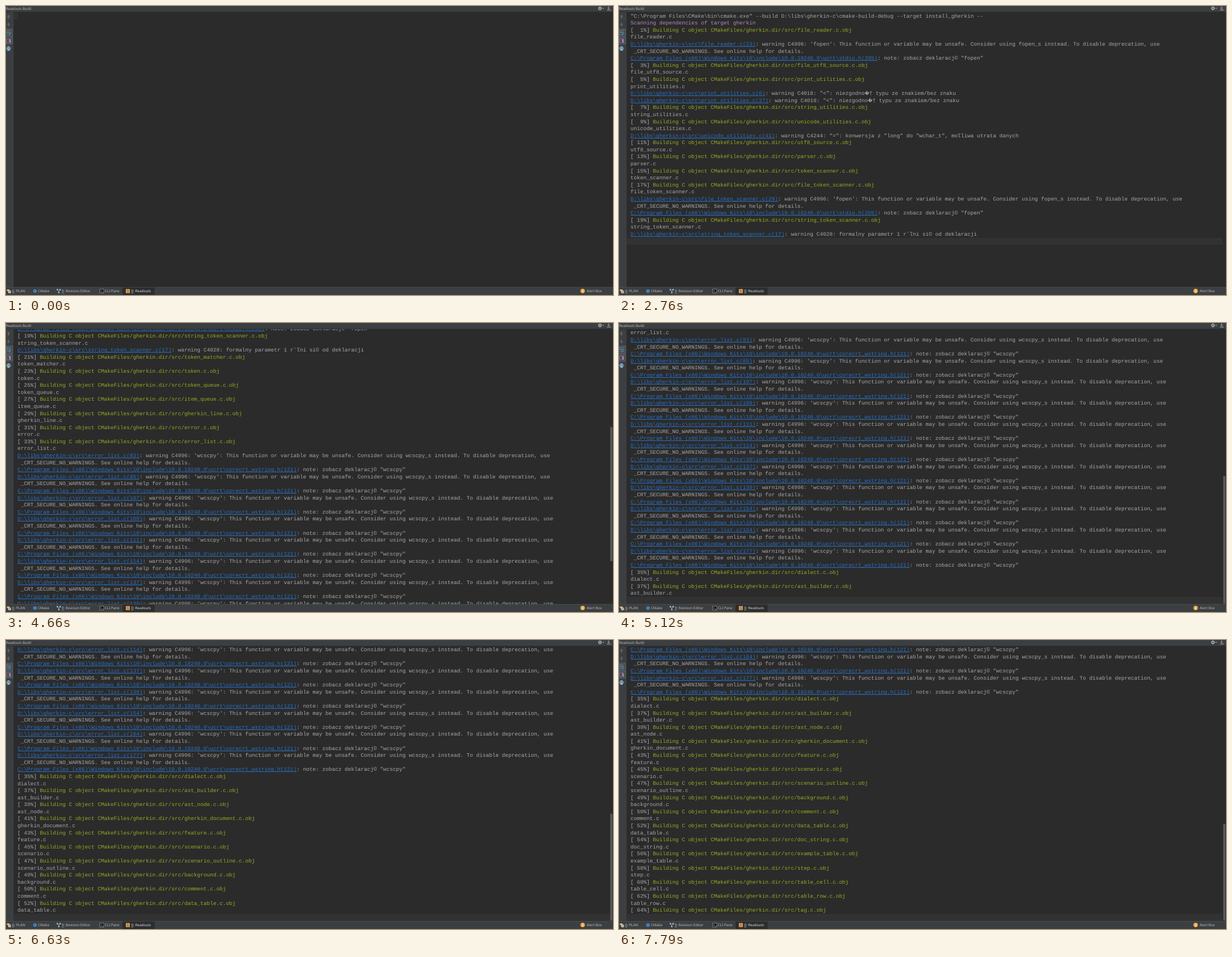
An HTML page that plays this animation: 1084 by 517 pixels, repeating every 8 s.

```html
<!DOCTYPE html>
<html lang="en">
<head>
<meta charset="utf-8">
<title>Build output</title>
<style>
html, body { margin: 0; width: 100%; height: 100%; overflow: hidden; background: #2b2b2b; }
body { position: relative; text-rendering: geometricPrecision; }
svg { position: absolute; left: 0; top: 0; }
svg text { font: 6.35px "Noto Sans", "Open Sans", sans-serif; fill: #bbb; white-space: pre; }
.key { text-decoration: underline; }
#pane { position: absolute; left: 14px; top: 11px; width: 1070px; height: 492px; overflow: hidden; }
#caret { position: absolute; left: 0; height: 12.6px; background: #323232; }
#rows {
  position: absolute; left: 6.5px; width: 1050px; overflow: hidden;
  font: 9.55px/12.6px "Liberation Mono", "Courier New", monospace;
  color: #a6a6a6; white-space: pre;
}
#rows div { position: relative; top: 1px; height: 12.6px; }
#thumb { position: absolute; left: 1065px; width: 4px; background: #58595a; }
.ok { color: #96aa22; }
.scan { color: #ae8abe; }
.link {
  color: #2870c4; text-decoration: underline; text-decoration-thickness: 1px;
  text-underline-offset: 1px; text-decoration-skip-ink: none;
}
.odd { font: 8px/0 "DejaVu Sans", sans-serif; }
</style>
</head>
<body>
<div id="pane">
  <div id="caret"></div>
  <div id="rows"></div>
  <div id="thumb"></div>
</div>

<svg width="1084" height="517" viewBox="0 0 1084 517">
  <path d="M0 0H1084V10.5H0ZM0 11H13.5V503H0ZM0 503H1084V517H0Z" fill="#3c3f41"/>
  <path d="M0 10.7H1084" stroke="#323435" stroke-width=".7"/>
  <path d="M0 503.3H1084" stroke="#505354" stroke-width=".8"/>
  <rect x="208" y="503.7" width="57.5" height="13.3" fill="#2b2d2e"/>

  <!-- header -->
  <text x="0" y="7.2">Readouts Build</text>
  <g stroke="#afb1b3" fill="none">
    <circle cx="1060.7" cy="4.2" r="2" stroke-width="1.5"/>
    <circle cx="1060.7" cy="4.2" r="3.1" stroke-width="1" stroke-dasharray="1.2 1.23"/>
    <path d="M1076.2 .8V5M1074.4 3.4L1076.2 5.3L1078 3.4M1073.2 7.2H1080" stroke-width="1"/>
  </g>
  <path d="M1065 3.6H1068L1066.5 5.3Z" fill="#afb1b3"/>

  <!-- side buttons -->
  <path d="M4.5 15.6L7.4 19H5.6V22.4H3.4V19H1.6ZM4.5 36.6L7.4 33.2H5.6V29.8H3.4V33.2H1.6Z" fill="#5f6365"/>
  <path d="M-1 41.5H11.4V53.8H-1ZM-1 55.6H11.4V68H-1Z" fill="#45494b" stroke="#67757d" stroke-width=".8"/>
  <g fill="none" stroke="#5fa9cf" stroke-width="1">
    <path d="M.8 44.5H8.5" stroke-dasharray="2 .8"/>
    <path d="M.8 47.4H7.2Q9 47.4 8.6 49.4T5 50.8M6.2 49.3L4.6 50.8L6.2 52.2M.8 50.8H3"/>
  </g>
  <path d="M1 58.7H8.2V65.2H1Z" fill="none" stroke="#8e8197" stroke-width=".8"/>
  <path d="M5.2 59.4H7.8V62.2L9 65.6H6.6L5.4 62.8Z" fill="#b57fd0"/>
  <path d="M2.3 72.2H6.8V74H2.3Z" fill="#8fabb9"/>
  <path d="M.6 74H8.5V77.7H.6Z" fill="#5596b8"/>
  <path d="M2.3 76.4H6.8V80H2.3Z" fill="#9fadb5"/>

  <!-- bottom tabs -->
  <path d="M1.5 507H6L7 509.5L4.5 511.5L1.5 509Z" fill="#d9b676"/>
  <circle cx="6.4" cy="511.4" r="2.7" fill="#c9c3b8"/>
  <path d="M6.4 509.8V511.6H7.8" fill="none" stroke="#6b5a3d" stroke-width=".7"/>
  <text x="11" y="512.4"><tspan class="key">6</tspan>: PLAN</text>

  <circle cx="51.7" cy="510" r="3.3" fill="#3f7fc1"/>
  <text x="57" y="512.4">CMake</text>

  <path d="M92 507.6L94.3 510.3V513M96.6 507.6L94.3 510.3" fill="none" stroke="#8db4cf" stroke-width="1"/>
  <g fill="#8fc0e2">
    <circle cx="91.8" cy="507.5" r="1.4"/><circle cx="96.7" cy="507.5" r="1.4"/><circle cx="94.3" cy="512.7" r="1.4"/>
  </g>
  <text x="99.5" y="512.4"><tspan class="key">9</tspan>: Revision Editor</text>

  <rect x="167.6" y="506.7" width="7.2" height="6.7" fill="#111" stroke="#a5a7a8" stroke-width=".7"/>
  <path d="M169 508.6L170.5 510L169 511.4M171.2 511.8H173.4" fill="none" stroke="#ddd" stroke-width=".7"/>
  <text x="176.6" y="512.4">CLI Pane</text>

  <rect x="214" y="506.4" width="7.2" height="7.2" fill="#e0a860"/>
  <path d="M215.3 508.3H218M215.3 510H219.8M215.3 511.8H220M219 507.6L220 508.6" stroke="#7a4f1c" stroke-width=".7"/>
  <text x="223.7" y="512.4" style="fill:#ddd"><tspan class="key">0</tspan>: Readouts</text>

  <circle cx="1029.8" cy="509.8" r="4.1" fill="#e0a03c"/>
  <text x="1028" y="512.1" style="font-weight:700;fill:#fff">2</text>
  <text x="1037" y="512.4">Alert Box</text>
</svg>

<script>
const LOOP = 8000, PITCH = 12.6, VIEW = 38, HEIGHT = 491;

const files = `file_reader file_utf8_source print_utilities string_utilities unicode_utilities
  utf8_source parser token_scanner file_token_scanner string_token_scanner token_matcher token
  token_queue item_queue gherkin_line error error_list dialect ast_builder ast_node
  gherkin_document feature scenario scenario_outline background comment data_table doc_string
  example_table step table_cell table_row tag`.split(/\s+/);

const span = (cls, text) => `<span class="${cls}">${text}</span>`;
const warn = (file, line, text) =>
  span('link', `D:\\libs\\gherkin-c\\src\\${file}.c(${line})`) + ': warning ' + text;

// A deprecation warning takes three rows
const unsafe = (file, line, fn, header) => [
  warn(file, line, `C4996: '${fn}': This function or variable may be unsafe. ` +
    `Consider using ${fn}_s instead. To disable deprecation, use`),
  ' _CRT_SECURE_NO_WARNINGS. See online help for details.',
  span('link', `C:\\Program Files (x86)\\Windows Kits\\10\\include\\10.0.10240.0\\ucrt\\${header}`) +
    `: note: zobacz deklaracj© "${fn}"`
];
const signs = line => warn('print_utilities', line,
  `C4018: "&lt;": niezgodno${span('odd', '\uFFFD')}† typu ze znakiem/bez znaku`);

const notes = {
  file_reader: unsafe('file_reader', 23, 'fopen', 'stdio.h(205)'),
  print_utilities: [6, 27].map(signs),
  unicode_utilities: [warn('unicode_utilities', 41,
    'C4244: "=": konwersja z "long" do "wchar_t", moľliwa utrata danych')],
  file_token_scanner: unsafe('file_token_scanner', 29, 'fopen', 'stdio.h(205)'),
  string_token_scanner: [warn('string_token_scanner', 17,
    'C4028: formalny parametr 1 r˘ľni si© od deklaracji')],
  error_list: [83, 85, 107, 109, 111, 114, 137, 139, 154, 164, 177]
    .flatMap(n => unsafe('error_list', n, 'wcscpy', 'corecrt_wstring.h(121)'))
};

const lines = [
  '"C:\\Program Files\\CMake\\bin\\cmake.exe" --build D:\\libs\\gherkin-c\\cmake-build-debug --target install_gherkin --',
  span('scan', 'Scanning dependencies of target gherkin'),
  ...files.flatMap((f, i) => [
    `[${String(2 * i + (i < 25)).padStart(3)}%] ` +
      span('ok', `Building C object CMakeFiles/gherkin.dir/src/${f}.c.obj`),
    f + '.c',
    ...(notes[f] || [])
  ])
];

// [time, printed lines, scroll in rows while it still lags behind]
const steps = [
  [0, 0], [90, 1], [840, 3], [1070, 9], [1360, 13], [1600, 16], [1830, 18], [2060, 21],
  [2290, 23], [2430, 26], [2760, 32], [3040, 34], [3360, 36], [3750, 39], [3980, 41],
  [4220, 43], [4660, 79, 28.56], [4740, 79, 38], [4810, 79], [5120, 83], [5330, 85],
  [5560, 88], [5790, 90], [6030, 93], [6390, 96], [6630, 99], [6930, 102], [7160, 104],
  [7400, 107], [7790, 110]
];

const [caret, rows, thumb] = ['caret', 'rows', 'thumb'].map(id => document.getElementById(id));
rows.innerHTML = lines.map(l => `<div>${l}</div>`).join('');

let shown;
function show(step) {
  const [, count, lag] = step;
  const scroll = lag ?? Math.max(0, count - VIEW);
  const top = 0.6 - scroll * PITCH;
  const total = count + 1;
  rows.style.top = top + 'px';
  rows.style.height = count * PITCH + 'px';
  caret.style.top = top + count * PITCH + 'px';
  caret.style.width = (count ? 1064 : 6.5) + 'px';
  thumb.style.display = count > VIEW ? 'block' : 'none';
  thumb.style.top = scroll / total * HEIGHT + 'px';
  thumb.style.height = (VIEW + 1) / total * HEIGHT + 'px';
}

function tick() {
  const t = performance.now() % LOOP;
  const step = steps.findLast(s => s[0] <= t);
  if (step !== shown) show(shown = step);
  requestAnimationFrame(tick);
}
tick();
</script>
</body>
</html>
```
